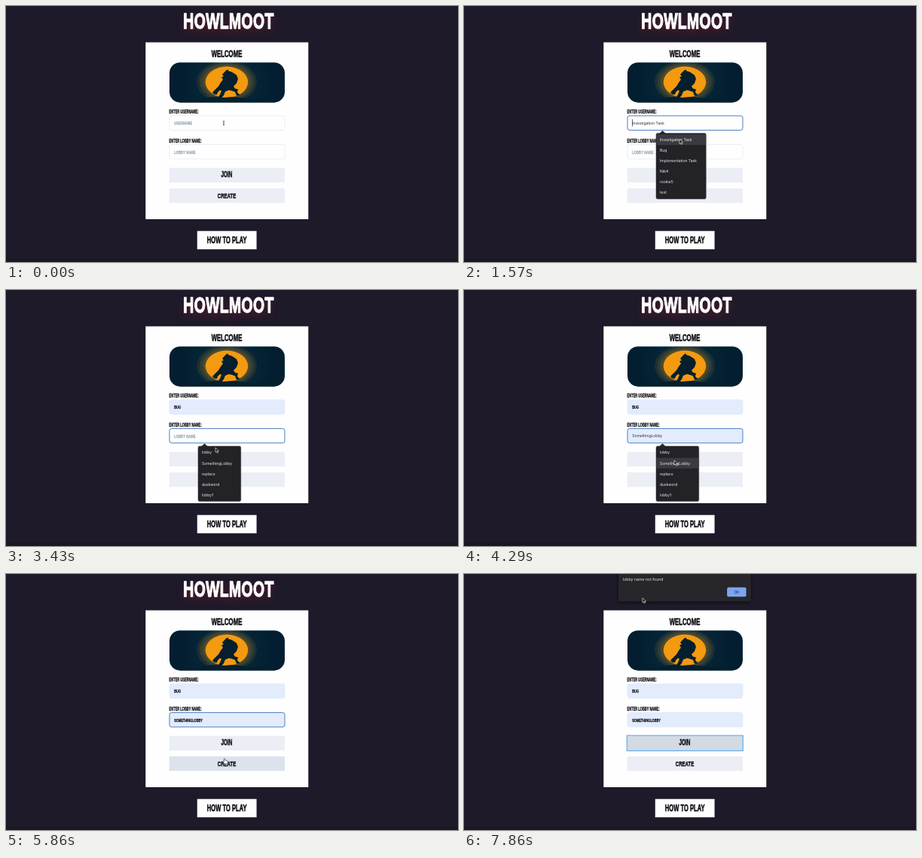
Write an HTML page that moves like this. It is 600 px wide and 341 px high and loops after 8000 ms.

```html
<!DOCTYPE html>
<html lang="en">
<head>
<meta charset="utf-8">
<title>Lobby form</title>
<style>
  html, body { margin: 0; width: 100%; height: 100%; overflow: hidden; background: #1e1a29; }
  svg { display: block; width: 100%; height: 100%; }
  .cond { font-family: "Liberation Sans", Arial, sans-serif; font-weight: 700; stroke-width: .045em; }
  .ui { font-family: Inter, Roboto, sans-serif; font-size: 5px; }
</style>
</head>
<body>
<svg id="stage" viewBox="0 0 600 341" preserveAspectRatio="none">
  <defs>
    <clipPath id="frame"><rect x="217" y="75.2" width="153" height="53.2" rx="14"/></clipPath>
    <radialGradient id="night" gradientUnits="userSpaceOnUse" cx="293" cy="102" r="80">
      <stop offset=".3" stop-color="#06283a"/><stop offset=".8" stop-color="#021e30"/>
    </radialGradient>
  </defs>
  <rect width="600" height="341" fill="#1e1a29"/>
  <rect y="336.5" width="600" height="4.5" fill="#1a1723"/>
  <g id="title" style="filter:drop-shadow(0 5px 4px #8c142866)"></g>
  <rect x="185.3" y="48.4" width="216" height="235.6" fill="#fefefe"/>

  <g clip-path="url(#frame)">
    <rect x="217" y="75" width="153" height="54" fill="url(#night)"/>
    <g fill="#b07a24">
      <ellipse cx="293" cy="101" rx="40" ry="28" opacity=".14"/>
      <ellipse cx="293" cy="101" rx="36" ry="25.5" opacity=".16"/>
      <ellipse cx="293" cy="101" rx="32" ry="23" opacity=".2"/>
    </g>
    <ellipse cx="293" cy="101.3" rx="28.3" ry="20.7" fill="#f39a10"/>
    <g fill="#051f2e">
      <path d="M217 126l20-2 16 1 14-3 10-1 12 1 12-1 11 1 14 2 20-1 24 3v4H217z"/>
      <path d="M289 89l3-3 2-1.5 1.5 2L300 88 306 92 308 97 306 103 302 107 304 110 308 111 307 115 311 119 306 119.500 304 114.500 300 113 296 112 291 114 289 119 286 122.500H281L284 118 286 113 284 112 281 115 280 118 276 117.500 274 115 278 111 282 107 285 102 288 98 286 95 289 93.500 287 91.500Z"/>
    </g>
  </g>

  <rect id="user" x="217" y="146.2" width="153" height="19.2" rx="2.8"/>
  <rect id="lobby" x="217" y="184.6" width="153" height="19.2" rx="2.8"/>
  <rect id="join" x="216.7" y="215.6" width="153.3" height="19.4"/>
  <rect id="create" x="216.7" y="242.9" width="153.3" height="19.4"/>
  <rect id="ring" x="216.3" y="215.1" width="154" height="20.4" fill="none" stroke="#62aee9" stroke-width="1.2"/>
  <rect x="253.8" y="299.7" width="78.8" height="24.4" fill="#fff"/>
  <g id="copy"></g>
  <text id="preview" class="ui" x="223.2" y="157.9" fill="#2b2b33"></text>
  <rect id="caret" width=".7" height="9.5" y="151" fill="#222"/>
  <g id="menus"></g>

  <g id="alert">
    <rect x="205" y="-6" width="176" height="42.5" rx="2" fill="#27262b" style="filter:drop-shadow(0 1px 2px #0009)"/>
    <text class="ui" x="211" y="9.4" fill="#e6e6e8" style="font-size:5.2px">lobby name not found</text>
    <rect x="349.2" y="17.8" width="25.4" height="12.4" rx="2" fill="#7da5ee"/>
    <text class="ui" x="361.9" y="25.8" text-anchor="middle" fill="#1b2440">OK</text>
  </g>

  <g id="cursor">
    <path id="beam" d="M-1.3-3Q0-3 0-2V2Q0 3-1.300 3M1.300-3Q0-3 0-2V2Q0 3 1.300 3" fill="none" stroke="#444" stroke-width=".6"/>
    <path id="arrow" d="M0 0V6L1.5 4.8 2.5 7 3.6 6.5 2.6 4.4 4.5 4.3Z" fill="#111" stroke="#fff" stroke-width=".6"/>
    <path id="hand" d="M-.6 0Q.3-.7.7.4L1.3 2.2 4 2.8Q4.6 5 3.8 7H.4L-2 4.2Q-2 3.2-.4 4Z" fill="#fff" stroke="#222" stroke-width=".6"/>
  </g>
</svg>
<script>
const NS = "http://www.w3.org/2000/svg";
const $ = id => document.getElementById(id);
const LOOP = 8000, STEP = 1000 / 7;
const INK = "#0d0d14";

function add(parent, tag, attrs, text = "") {
  const el = document.createElementNS(NS, tag);
  for (const k in attrs) el.setAttribute(k, attrs[k]);
  el.textContent = text;
  return parent.appendChild(el);
}

// Condensed display lettering, one width factor for all
function cond(parent, text, x, y, size, anchor = "start", color = INK) {
  return add(parent, "text", {
    class: "cond", "font-size": size, fill: color, stroke: color, "text-anchor": anchor,
    transform: `translate(${x} ${y}) scale(.64 1)`
  }, text);
}

function menu(x, y, w, items) {
  const g = add($("menus"), "g", {});
  const h = items.length * 14.1 + 3;
  add(g, "path", { d: `M${x + 4} ${y + .5}l4.5-4 4.5 4z`, fill: "#232227" });
  add(g, "rect", { x, y, width: w, height: h, rx: 2, fill: "#232227", stroke: "#3c3b41", "stroke-width": .5 });
  const bar = add(g, "rect", { x: x + .3, width: w - .6, height: 14.1, fill: "#3b3a40" });
  items.forEach((s, i) =>
    add(g, "text", { class: "ui", x: x + 5, y: y + 10.4 + i * 14.1, fill: "#ededf0" }, s));
  return (on, row) => {
    show(g, on);
    show(bar, on && row >= 0);
    bar.setAttribute("y", y + 1.5 + Math.max(row, 0) * 14.1);
  };
}

const show = (el, on) => el.setAttribute("visibility", on ? "inherit" : "hidden");
const fill = (id, color) => $(id).setAttribute("fill", color);

cond($("title"), "HOWLMOOT", 295.5, 30.2, 30.3, "middle", "#fff").setAttribute("letter-spacing", .6);
const copy = $("copy");
cond(copy, "WELCOME", 293, 67.6, 12.2, "middle");
cond(copy, "ENTER USERNAME:", 216.6, 143.1, 6.3);
cond(copy, "ENTER LOBBY NAME:", 216.6, 181.7, 6.3);
cond(copy, "JOIN", 293, 228.4, 10, "middle");
cond(copy, "CREATE", 293, 255.8, 9.5, "middle");
cond(copy, "HOW TO PLAY", 293.2, 316.1, 11.9, "middle");
const userText = cond(copy, "", 223.2, 158, 6.2);
const lobbyText = cond(copy, "", 223.2, 196.5, 6.2);

const userMenu = menu(255, 169.5, 66.3,
  ["Investigation Task", "Bug", "Implementation Task", "Nib4", "rookie5", "test"]);
const lobbyMenu = menu(255, 208, 56.8,
  ["lobby", "SomethingLobby", "replace", "duskword", "lobby1"]);

// time, x, y of the pointer tip
const path = [
  [0, 289, 156], [860, 289, 156], [1290, 287, 174], [1570, 286, 177.5], [2000, 278, 194],
  [3140, 278, 194], [3430, 278, 210], [4000, 279, 227], [4570, 279, 227],
  [5290, 290, 246], [5860, 290, 246], [6430, 290, 224], [7430, 290, 224], [7860, 237, 32], [8000, 237, 32]
];

function pointer(t) {
  let i = 1;
  while (i < path.length - 1 && t > path[i][0]) i++;
  const [t0, x0, y0] = path[i - 1], [t1, x1, y1] = path[i];
  const p = Math.min(1, Math.max(0, (t - t0) / (t1 - t0)));
  const e = p * p * (3 - 2 * p);
  return [x0 + (x1 - x0) * e, y0 + (y1 - y0) * e];
}

function field(id, filled, focus) {
  const el = $(id);
  fill(id, filled ? "#e3ecfd" : "#fefefe");
  el.setAttribute("stroke", focus ? "#4a80be" : filled ? "#dfe8f8" : "#e2e7ee");
  el.setAttribute("stroke-width", focus ? 1 : .7);
}

function label(el, value, hint) {
  const color = value ? INK : "#98a6b9";
  el.textContent = value || hint;
  el.setAttribute("letter-spacing", value ? 0 : .3);
  el.setAttribute("fill", color);
  el.setAttribute("stroke", color);
}

function draw(ms) {
  const t = Math.floor((ms + 4) / STEP) * STEP + 3;
  const within = (a, b) => t >= a && t < b;
  const [x, y] = pointer(t);

  const userOpen = within(860, 2280), lobbyOpen = within(3140, 4420);
  const userRow = !userOpen || y < 171 ? -1 : y < 185.1 ? 0 : 1;
  const lobbyRow = !lobbyOpen || y < 210.5 ? -1 : y < 223.6 ? 0 : 1;
  userMenu(userOpen, userRow);
  lobbyMenu(lobbyOpen, lobbyRow);

  const userSet = t >= 2280, lobbySet = t >= 4420;
  field("user", userSet, within(565, 2850));
  field("lobby", lobbySet || lobbyRow >= 0, within(2850, 6700));
  label(userText, userSet ? "BUG" : "", "USERNAME");
  label(lobbyText, lobbySet ? "SOMETHINGLOBBY" : "", "LOBBY NAME");
  show(userText, userRow < 0);
  show(lobbyText, lobbyRow < 0);

  const hint = $("preview");
  hint.textContent = userRow >= 0 ? ["Investigation Task", "Bug"][userRow]
    : lobbyRow >= 0 ? ["lobby", "SomethingLobby"][lobbyRow] : "";
  hint.setAttribute("y", userRow >= 0 ? 157.9 : 196.4);
  show($("caret"), within(565, 2850));
  $("caret").setAttribute("x", userSet ? 232 : 223);

  const overJoin = t >= 4420 && t < 7000 && y > 215 && y < 235;
  const overCreate = t >= 4420 && y > 242.5 && y < 262.5;
  const pressed = t >= 6700;
  fill("join", pressed ? "#d4dae4" : overJoin ? "#dce3ec" : "#ebeef5");
  fill("create", overCreate ? "#dce3ec" : "#ebeef5");
  show($("ring"), pressed);

  const alertOn = t >= 6995;
  show($("alert"), alertOn);
  show($("title"), !alertOn);

  const beam = t < 860 || within(2280, 3140);
  const hand = overJoin || overCreate;
  show($("beam"), beam);
  show($("hand"), hand);
  show($("arrow"), !beam && !hand);
  $("cursor").setAttribute("transform", `translate(${x.toFixed(1)} ${y.toFixed(1)})`);
}

const start = performance.now();
function tick() {
  draw((performance.now() - start) % LOOP);
  requestAnimationFrame(tick);
}
tick();
</script>
</body>
</html>
```
